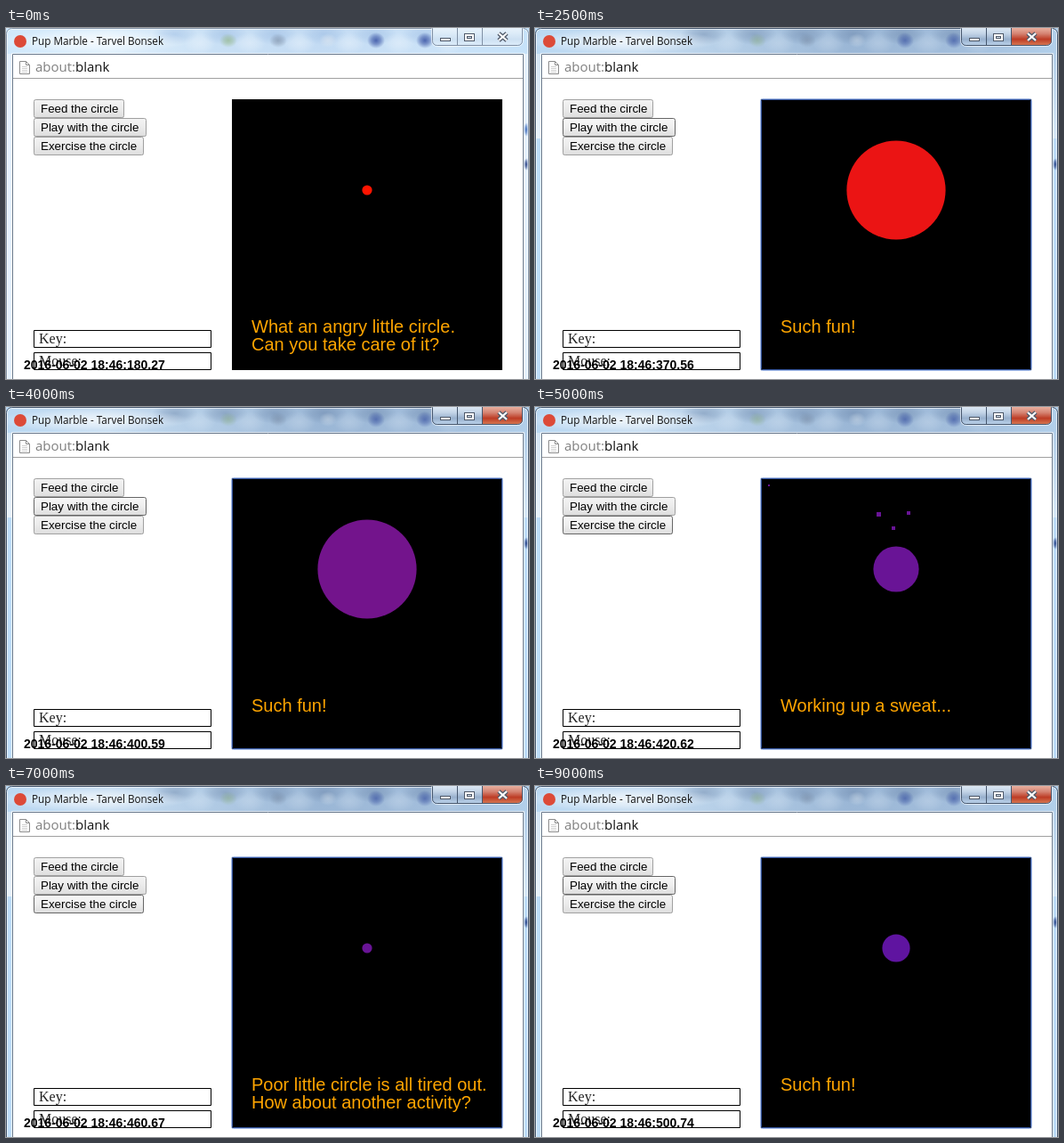
Recreate the animation shown at these times as an HTML page with a canvas. Size 588 by 394 pixels, loop 9.5 s.

```html
<!DOCTYPE html>
<html lang="en">
<head>
<meta charset="utf-8">
<title>Pup Marble</title>
<style>
  html, body { margin: 0; width: 100%; height: 100%; overflow: hidden; background: #fff; }
  canvas { display: block; }
</style>
</head>
<body>
<canvas id="stage" width="588" height="394"></canvas>
<script>
const ctx = document.getElementById('stage').getContext('2d');
const STEP = 500, STEPS = 19;
const SANS = '"Liberation Sans", Arial, sans-serif';
const UI = '"Open Sans", "Noto Sans", sans-serif';
const SERIF = '"Liberation Serif", Times, serif';

// One entry per step
const radii = [5, 5, 10, 25, 40, 55, 55, 55, 55, 40, 25, 10, 5, 5, 5, 5, 10, 15, 15];
const hundredths = [27, 50, 51, 53, 54, 56, 56, 57, 59, 60, 62, 63, 64, 66, 67, 69, 71, 72, 74];

// Each scene: first step, hovered button, caption lines
const scenes = [
  [0, -1, 'What an angry little circle.', 'Can you take care of it?'],
  [2, 0, 'Nom nom nom...'],
  [5, 1, 'Such fun!'],
  [9, 2, 'Working up a sweat...'],
  [12, 2, 'Poor little circle is all tired out.', 'How about another activity?'],
  [16, 0, 'Nom nom nom...'],
  [18, 1, 'Such fun!']
];

// Sweat drops: x, y, size
const sweat = {
  9: [[372, 126, 5], [431, 121, 4], [408, 112, 4]],
  10: [[384, 118, 5], [418, 117, 4], [401, 134, 4], [262, 87, 2]],
  11: [[392, 141, 4], [414, 130, 4], [427, 146, 3]]
};

function rect(x, y, w, h, fill) {
  ctx.fillStyle = fill;
  ctx.fillRect(x, y, w, h);
}

function outline(x, y, w, h, color, r = 0) {
  ctx.strokeStyle = color;
  ctx.lineWidth = 1;
  ctx.beginPath();
  ctx.roundRect(x + .5, y + .5, w - 1, h - 1, r);
  ctx.stroke();
}

function text(s, x, y, font, color) {
  ctx.font = font;
  ctx.fillStyle = color;
  ctx.fillText(s, x, y);
}

function disc(x, y, r, fill) {
  ctx.fillStyle = fill;
  ctx.beginPath();
  ctx.arc(x, y, r, 0, Math.PI * 2);
  ctx.fill();
}

function gradient(x0, y0, x1, y1, colors) {
  const g = ctx.createLinearGradient(x0, y0, x1, y1);
  colors.forEach((c, i) => g.addColorStop(i / (colors.length - 1), c));
  return g;
}

function glow(x, y, rx, ry, rgb, alpha) {
  const g = ctx.createRadialGradient(0, 0, 0, 0, 0, 1);
  g.addColorStop(0, `rgba(${rgb},${alpha})`);
  g.addColorStop(.5, `rgba(${rgb},${alpha * .6})`);
  g.addColorStop(1, `rgba(${rgb},0)`);
  ctx.save();
  ctx.translate(x, y);
  ctx.scale(rx, ry);
  disc(0, 0, 1, g);
  ctx.restore();
}

function drawGlass(active) {
  rect(0, 0, 588, 394, active ? '#bddcf8' : '#e4f1fd');
  rect(0, 0, 588, 29, gradient(0, 0, 588, 0, active
    ? ['#bad8f2', '#c8def2', '#b0cae4', '#9bb7d6', '#a2bddb', '#b2cfea']
    : ['#d0e8fb', '#e0f0fc', '#c9e0f5', '#c3dbf3', '#cbe2f7', '#c6e2f9']));

  for (let x = 190; x < 490; x += 56) {
    glow(x, 7, 26, 12, active ? '92,119,157' : '140,175,220', .4);
    glow(x + 28, 17, 18, 12, '235,244,252', active ? .25 : .5);
  }
  const fade = active ? .4 : .6;
  glow(250, 14, 10, 8, '132,171,92', fade * .8);
  glow(306, 14, 10, 8, '105,119,140', fade * .8);
  glow(362, 14, 10, 8, '222,231,240', fade);
  glow(416, 14, 10, 9, '47,73,158', fade + .2);
  glow(471, 14, 10, 9, '47,73,158', fade + .2);
  glow(98, 15, 110, 13, '255,255,255', .7);

  if (active) {
    rect(0, 29, 7, 95, gradient(0, 29, 0, 124, ['#d5e6f5', '#e8f2fb']));
    rect(582, 29, 6, 95, gradient(0, 29, 0, 124, ['#b5d0ea', '#d8e9f8']));
  }
  glow(586, 153, 5, 7, '24,51,124', .9);
  if (!active) glow(586, 114, 5, 8, '50,100,185', .9);

  // Light inner rims, then the dark outer edge
  const rim = 'rgba(255,255,255,.65)';
  outline(1, 1, 586, 400, rim, 5);
  outline(6, 28, 577, 380, rim);
  outline(0, 0, 588, 402, active ? '#46586f' : '#8595a8', 6);
}

function drawControls(active) {
  const fill = active
    ? ['#dce8f4', '#c3d4e7', '#98b0cd', '#b9d0e8']
    : ['#e8f2fb', '#dcebf8', '#cde0f2', '#dcecfa'];
  const close = active ? ['#e9b0a0', '#d58372', '#bd3c25', '#d67550'] : fill;
  const edge = active ? '#45566d' : '#8090a5';
  ctx.save();
  ctx.beginPath();
  ctx.roundRect(479, 0, 102, 19, [0, 0, 5, 5]);
  ctx.clip();
  rect(479, 0, 56, 19, gradient(0, 0, 0, 19, fill));
  rect(535, 0, 46, 19, gradient(0, 0, 0, 19, close));
  rect(507, 0, 1, 19, edge);
  rect(535, 0, 1, 19, edge);
  ctx.restore();
  outline(478, -5, 104, 26, 'rgba(255,255,255,.6)', 6);
  outline(479, -5, 102, 25, edge, 5);

  rect(488, 11, 12, 4, '#4f5969');
  rect(489, 12, 10, 2, '#fff');
  rect(515, 6, 12, 9, '#4f5969');
  rect(516, 7, 10, 7, '#fff');
  rect(518, 9, 6, 3, '#4f5969');
  rect(519, 10, 4, 1, '#d7e3ef');

  for (const [color, width] of [['#4f5969', 4.8], ['#fff', 2.2]]) {
    ctx.strokeStyle = color;
    ctx.lineWidth = width;
    ctx.beginPath();
    ctx.moveTo(554, 6);
    ctx.lineTo(563, 14);
    ctx.moveTo(563, 6);
    ctx.lineTo(554, 14);
    ctx.stroke();
  }
}

function drawPageIcon() {
  ctx.fillStyle = '#fff';
  ctx.strokeStyle = '#8c8c8c';
  ctx.lineWidth = 1;
  ctx.beginPath();
  ctx.moveTo(15.5, 37.5);
  ctx.lineTo(22.5, 37.5);
  ctx.lineTo(26.5, 41.5);
  ctx.lineTo(26.5, 51.5);
  ctx.lineTo(15.5, 51.5);
  ctx.closePath();
  ctx.moveTo(22.5, 37.5);
  ctx.lineTo(22.5, 41.5);
  ctx.lineTo(26.5, 41.5);
  ctx.fill();
  ctx.stroke();
  for (let y = 43; y < 50; y += 2) rect(18, y, 6, 1, '#d0d0d0');
}

function drawWindow(active) {
  drawGlass(active);
  drawControls(active);
  disc(16, 15, 7, '#dc4a38');
  text('Pup Marble - Tarvel Bonsek', 29, 19, `11.7px ${UI}`, '#111');
  rect(7, 29, 575, 365, '#fff');
  outline(7, 29, 575, 380, '#6b7a8d');
  rect(8, 56, 573, 1, '#a0a0a0');
  drawPageIcon();
  text('about:', 33, 49, `15px ${UI}`, '#808080');
  text('blank', 78, 49, `15px ${UI}`, '#111');
}

function drawButton(label, y, w, hover) {
  ctx.fillStyle = gradient(0, y, 0, y + 21,
    hover ? ['#f8f8f8', '#eeeeee', '#dcdcdc'] : ['#f4f4f4', '#ebebeb', '#dddddd']);
  ctx.beginPath();
  ctx.roundRect(31, y, w, 21, 2);
  ctx.fill();
  outline(31, y, w, 21, hover ? '#666' : '#a0a0a0', 2);
  text(label, 39, y + 15, `13.33px ${SANS}`, '#000');
}

function drawField(label, y) {
  outline(31, y, 200, 20, '#000');
  text(label, 37, y + 15, `16px ${SERIF}`, '#222');
}

// Red drains into blue whenever the circle is played with
function circleColor(i) {
  let blue = 0;
  if (i >= 5) blue = Math.min(150, 20 + (i - 5) * 40);
  if (i === 18) blue = 160;
  return `rgb(${255 - blue},20,${blue})`;
}

function drawPet(i, active, lines) {
  rect(254, 80, 304, 304, '#000');
  if (active) {
    outline(253, 79, 306, 306, '#a3b9e3', 2);
    outline(254, 80, 304, 304, '#34549b', 1);
  }
  const color = circleColor(i);
  disc(406, 182, radii[i] + .6, color);
  for (const [x, y, size] of sweat[i] || []) rect(x, y, size, size, color);
  lines.forEach((line, n) => text(line, 276, 342 + n * 20, `20px ${SANS}`, '#ffa500'));
}

function draw(i) {
  const active = i >= 2;
  const [, hover, ...lines] = scenes.findLast(scene => scene[0] <= i);
  drawWindow(active);
  [['Feed the circle', 102], ['Play with the circle', 127], ['Exercise the circle', 124]]
    .forEach(([label, w], n) => drawButton(label, 80 + n * 21, w, n === hover));
  drawField('Key:', 339);
  drawField('Mouse:', 364);
  drawPet(i, active, lines);
  const second = i ? 32 + i : 18;
  text(`2016-06-02 18:46:${second}0.${hundredths[i]}`, 20, 383, `bold 14px ${SANS}`, '#000');
}

const start = performance.now();
function tick() {
  draw(Math.floor((performance.now() - start) / STEP) % STEPS);
  requestAnimationFrame(tick);
}
tick();
</script>
</body>
</html>
```
